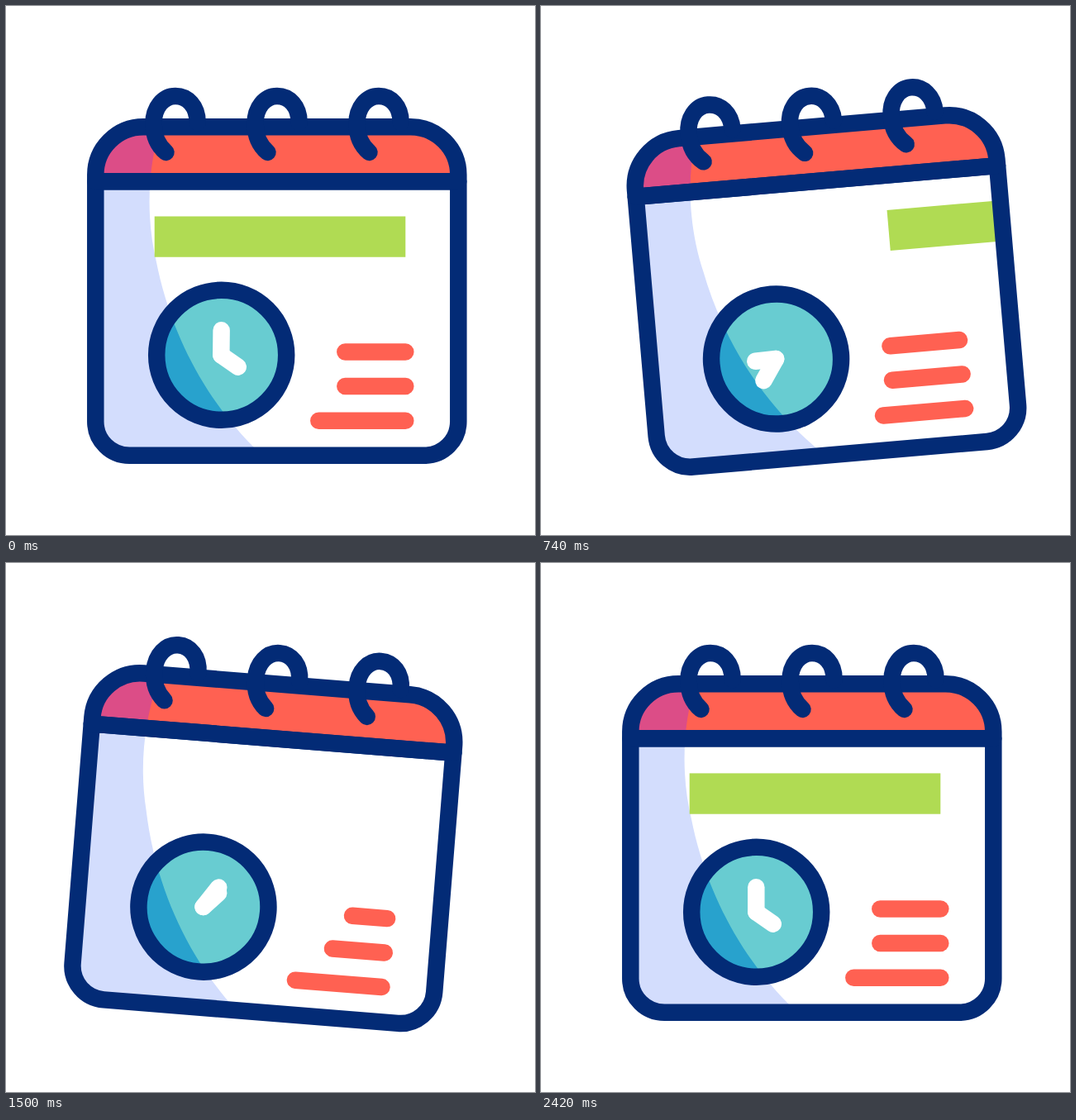
These frames come from a looping animation (640x640 px, 2.62 s). An HTML page:

```html
<!DOCTYPE html>
<html lang="en">
<head>
<meta charset="utf-8">
<title>Calendar</title>
<style>
  html, body { margin: 0; width: 100%; height: 100%; overflow: hidden; background: #fff; }
  svg { display: block; width: 100%; height: 100%; }
  .line { fill: none; stroke-width: 20.5; stroke-linecap: round; stroke-linejoin: round; }
  .navy { stroke: #032b76; }
  .red { stroke: #ff6152; }
  .white { stroke: #fff; }
</style>
</head>
<body>
<svg viewBox="0 0 640 640">
  <defs>
    <path id="head" d="M108.3 212.3V204.3a58 58 0 0 1 58-58H489.3a58 58 0 0 1 58 58V212.3Z"/>
    <path id="page" d="M108.3 212.3H547.3V502.8a41 41 0 0 1-41 41H149.3a41 41 0 0 1-41-41Z"/>
    <path id="shade" d="M100 146H187C170 200 170 260 182 310C197 385 234 472 310 543.8H100Z"/>
    <path id="ring" class="line navy" d="M231.7 141C231.7 121 219.5 108.9 205 108.9C190 108.9 178.5 123 178.5 142C178.5 157 184 169 193.5 177"/>
    <clipPath id="inHead"><use href="#head"/></clipPath>
    <clipPath id="inPage"><use href="#page"/></clipPath>
    <clipPath id="inClock"><circle cx="260.7" cy="422.3" r="78.5"/></clipPath>
  </defs>
  <g id="calendar">
    <use href="#page" fill="#fff"/>
    <use href="#head" fill="#ff6152"/>
    <g clip-path="url(#inHead)"><use href="#shade" fill="#dc4d87"/></g>
    <g clip-path="url(#inPage)">
      <use href="#shade" fill="#d3ddfd"/>
      <rect id="bar" x="179.7" y="254.4" width="303.6" height="49.3" fill="#b0db53"/>
    </g>
    <g id="rows"></g>
    <use href="#page" class="line navy"/>
    <use href="#head" class="line navy"/>
    <use href="#ring"/>
    <use href="#ring" x="123"/>
    <use href="#ring" x="246"/>
    <circle cx="260.7" cy="422.3" r="78.5" fill="#68ccd1"/>
    <g clip-path="url(#inClock)"><use href="#shade" fill="#28a2cd"/></g>
    <circle class="line navy" cx="260.7" cy="422.3" r="78.5"/>
    <path id="minute" class="line white" d="M260.3 422.3v-30"/>
    <path id="hour" class="line white" d="M260.3 422.3v-25"/>
  </g>
</svg>
<script>
  const LOOP = 2620, MOVE = 2400;
  const $ = id => document.getElementById(id);
  const smooth = p => p * p * (3 - 2 * p);

  // Eased value of a track at time t
  function track(times, values, t) {
    let i = 1;
    while (i < times.length - 1 && t > times[i]) i++;
    const p = (t - times[i - 1]) / (times[i] - times[i - 1]);
    return values[i - 1] + (values[i] - values[i - 1]) * smooth(Math.min(1, Math.max(0, p)));
  }

  // cubic-bezier(.167, .167, .667, 1)
  function spin(x) {
    const bez = (a, b, s) => 3 * a * s * (1 - s) ** 2 + 3 * b * s * s * (1 - s) + s ** 3;
    let lo = 0, hi = 1;
    for (let i = 0; i < 24; i++) {
      const mid = (lo + hi) / 2;
      if (bez(1 / 6, 2 / 3, mid) < x) lo = mid; else hi = mid;
    }
    return bez(1 / 6, 1, lo);
  }

  const rowTimes = [0, 360, 720, 1040, 1480, 1960, MOVE];
  const rows = [
    { y: 418.5, len: [73, 18.5, 84, 73, 42, 87, 73] },
    { y: 460, len: [73, 31, 85, 73, 63, 72, 73] },
    { y: 501.7, len: [105, 84.5, 99.4, 105, 105, 78, 105] }
  ];
  for (const row of rows) {
    row.el = document.createElementNS('http://www.w3.org/2000/svg', 'path');
    row.el.setAttribute('class', 'line red');
    $('rows').append(row.el);
  }

  const turn = (id, deg, x, y) => $(id).setAttribute('transform', `rotate(${deg} ${x} ${y})`);

  function draw(now) {
    const t = Math.min(now % LOOP, MOVE);
    const k = spin(t / MOVE);
    turn('calendar', track([0, 800, 1600, MOVE], [0, -5, 5, 0], t), 327, 147);
    turn('minute', 1440 * k, 260.3, 422.3);
    turn('hour', 125 + 360 * k, 260.3, 422.3);
    const shift = t < 1250
      ? track([400, 1000], [0, 382], t)
      : track([1500, 2100], [-382, 0], t);
    $('bar').setAttribute('transform', `translate(${shift} 0)`);
    for (const { el, y, len } of rows) {
      el.setAttribute('d', `M483.3 ${y}h${-track(rowTimes, len, t)}`);
    }
  }

  const start = performance.now();
  function tick() {
    draw(performance.now() - start);
    requestAnimationFrame(tick);
  }
  tick();
</script>
</body>
</html>
```
